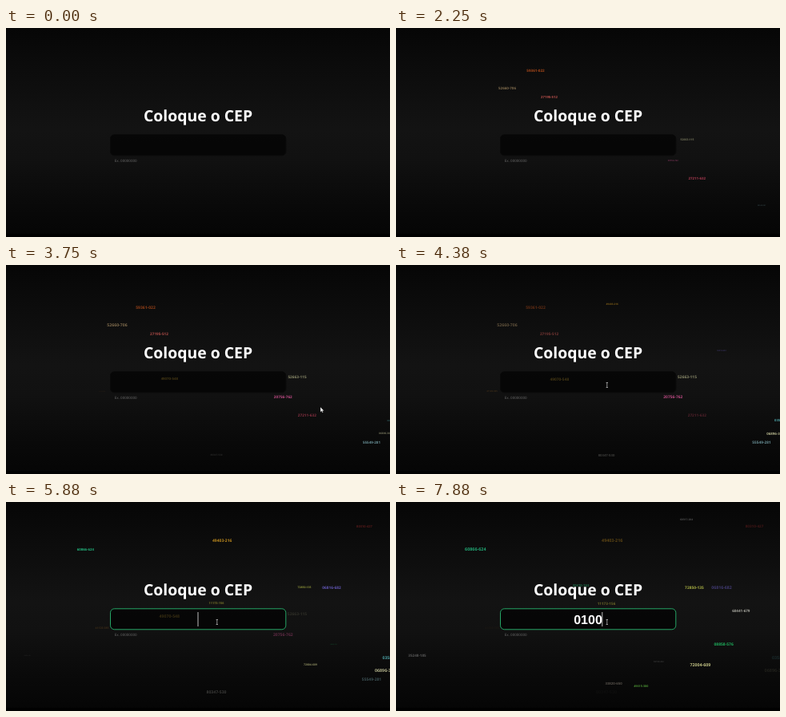
An HTML page that plays this animation: 480x262 px, repeating every 8000 ms.

```html
<!DOCTYPE html>
<html lang="pt-BR">
<head>
<meta charset="utf-8">
<title>Coloque o CEP</title>
<style>
  html, body { margin: 0; width: 100%; height: 100%; overflow: hidden; background: #070707; }
  svg { display: block; width: 100vw; height: 100vh; }
  text { font-family: "Noto Sans", "Open Sans", sans-serif; text-rendering: geometricPrecision; }
  #codes text { font-weight: 600; text-anchor: middle; }
  #title { font-weight: 700; font-size: 19.4px; fill: #fff; text-anchor: middle; }
  #hint { font-size: 4.5px; fill: #666; }
  #typed { font: 700 16px "Liberation Sans", Arial, sans-serif; fill: #fff; text-anchor: middle; }
</style>
</head>
<body>
<svg viewBox="0 0 480 262" preserveAspectRatio="none">
  <defs>
    <linearGradient id="shade" x2="0" y2="1">
      <stop offset="0" stop-color="#060606"/>
      <stop offset=".2" stop-color="#0c0c0c"/>
      <stop offset=".48" stop-color="#131313"/>
      <stop offset=".62" stop-color="#111"/>
      <stop offset=".85" stop-color="#090909"/>
      <stop offset="1" stop-color="#050505"/>
    </linearGradient>
  </defs>
  <rect width="480" height="262" fill="url(#shade)"/>
  <rect y="258" width="480" height="4" fill="#010101"/>
  <g id="codes"></g>
  <text id="title" x="240" y="117">Coloque o CEP</text>
  <rect id="field" x="130.5" y="133.8" width="219.3" height="26" rx="5" fill="#000" fill-opacity=".65"/>
  <text id="hint" x="135.8" y="167.7">Ex. 00000000</text>
  <text id="typed" x="240" y="152.6"></text>
  <rect id="caret" y="138" width="1" height="18" fill="#bbb"/>
  <path id="arrow" d="M0 0V6.4L1.5 5.1L2.5 7.2L3.5 6.7L2.5 4.7H4.5Z" fill="#fff" stroke="#000" stroke-width=".3"/>
  <path id="beam" d="M262.6 147.5h2.4M262.6 153.5h2.4M263.8 147.5v6" stroke="#ccc" stroke-width=".7" fill="none"/>
</svg>
<script>
const LOOP = 8000, STEP = 125;
const FOCUS = 4875;
const KEYS = [[6625, "0"], [7000, "01"], [7250, "010"], [7625, "0100"]];
const POINTER = [[3250, 481, 262], [3750, 393, 178], [4375, 264, 148]];

// text, center x, center y, full width, color, start time
const CODES = [
  ["59361-022", 174.5, 53.3, 25, "#a8481a", 300],
  ["52660-706", 139, 75.3, 26, "#7d6a4c", 650],
  ["27195-512", 191.5, 86, 23.5, "#b9504c", 400],
  ["27211-632", 376.3, 188, 23.5, "#a83a50", 100],
  ["52663-115", 364, 140, 24.5, "#878768", 1230],
  ["20756-762", 346.3, 165.7, 25, "#bd4a84", 1630],
  ["55549-281", 457, 222, 24.5, "#688f96", 1790],
  ["49070-548", 204.3, 142.8, 26, "#c09c38", 2280],
  ["80347-530", 263, 238, 26, "#3c3c3a", 3020],
  ["06896-304", 474, 211, 27, "#b4b48c", 3000],
  ["03584-217", 483, 195, 26, "#4ba0a4", 3150],
  ["49403-216", 270.2, 48.5, 26.5, "#bd8a1e", 3630],
  ["06816-682", 407, 106.8, 26, "#6156b4", 3880],
  ["11173-156", 263, 127, 23, "#77732a", 4395],
  ["60866-624", 99.3, 59.5, 27, "#22b07a", 4575],
  ["41120-385", 120, 158, 18, "#3c2c18", 3200],
  ["80310-427", 448, 30.5, 23, "#541a1a", 4200],
  ["72850-135", 373, 106.8, 24.5, "#a9b043", 4880],
  ["72004-609", 380.4, 204, 27, "#c2c284", 5035],
  ["35248-185", 26.5, 192.3, 24, "#565656", 5520],
  ["08858-576", 409.6, 178, 26, "#1fae5c", 5540],
  ["60441-679", 431.3, 136.3, 25, "#a8a8a0", 5970],
  ["20410-163", 231, 104, 25, "#1c6644", 6400],
  ["33820-650", 272, 227.3, 26, "#55504a", 6430],
  ["49615-380", 306.3, 231, 26, "#56a83c", 6860],
  ["60317-204", 363, 22.3, 26, "#707070", 7050],
  ["58190-432", 328.4, 200, 26, "#606060", 7290]
];

const byId = id => document.getElementById(id);
const [layer, field, typed, caret, arrow, beam] =
  ["codes", "field", "typed", "caret", "arrow", "beam"].map(byId);
const clamp = v => Math.max(0, Math.min(1, v));
const show = (node, on) => node.setAttribute("visibility", on ? "visible" : "hidden");

const floaters = CODES.map(([text, x, y, width, color, start]) => {
  const node = document.createElementNS("http://www.w3.org/2000/svg", "text");
  node.textContent = text;
  node.setAttribute("dy", ".36em");
  node.setAttribute("fill", color);
  node.setAttribute("font-size", width / 4.9);
  layer.append(node);
  return { node, x, y, start };
});

function drawCode({ node, x, y, start }, time) {
  const age = time - start;
  const visible = age > 0 && time >= 600;
  show(node, visible);
  if (!visible) return;
  const scale = 1 - Math.exp(-age / 850);
  const alpha = Math.min(clamp(age / 1200), clamp((5100 - age) / 1900));
  node.setAttribute("transform", `translate(${x} ${y}) scale(${scale})`);
  node.setAttribute("opacity", alpha);
}

function pointerAt(time) {
  const next = POINTER.findIndex(p => p[0] > time);
  if (next < 0) return POINTER.at(-1).slice(1);
  if (next === 0) return POINTER[0].slice(1);
  const [a, b] = [POINTER[next - 1], POINTER[next]];
  const k = (time - a[0]) / (b[0] - a[0]);
  return [a[1] + (b[1] - a[1]) * k, a[2] + (b[2] - a[2]) * k];
}

function draw(time) {
  floaters.forEach(f => drawCode(f, time));

  const focused = time >= FOCUS;
  field.setAttribute("stroke", focused ? "#25a566" : "#090909");

  const key = KEYS.filter(k => k[0] <= time).at(-1);
  const text = key ? key[1] : "";
  typed.textContent = text;
  caret.setAttribute("x", 239.5 + text.length * 4.45);
  show(caret, focused && (key || (time - FOCUS) % 1000 < 500));

  const overField = time >= 4375;
  arrow.setAttribute("transform", `translate(${pointerAt(time)})`);
  show(arrow, time >= POINTER[0][0] && !overField);
  show(beam, overField);
}

const origin = performance.now();
function tick() {
  const time = (performance.now() - origin) % LOOP;
  draw(Math.floor(time / STEP) * STEP);
  requestAnimationFrame(tick);
}
tick();
</script>
</body>
</html>
```
